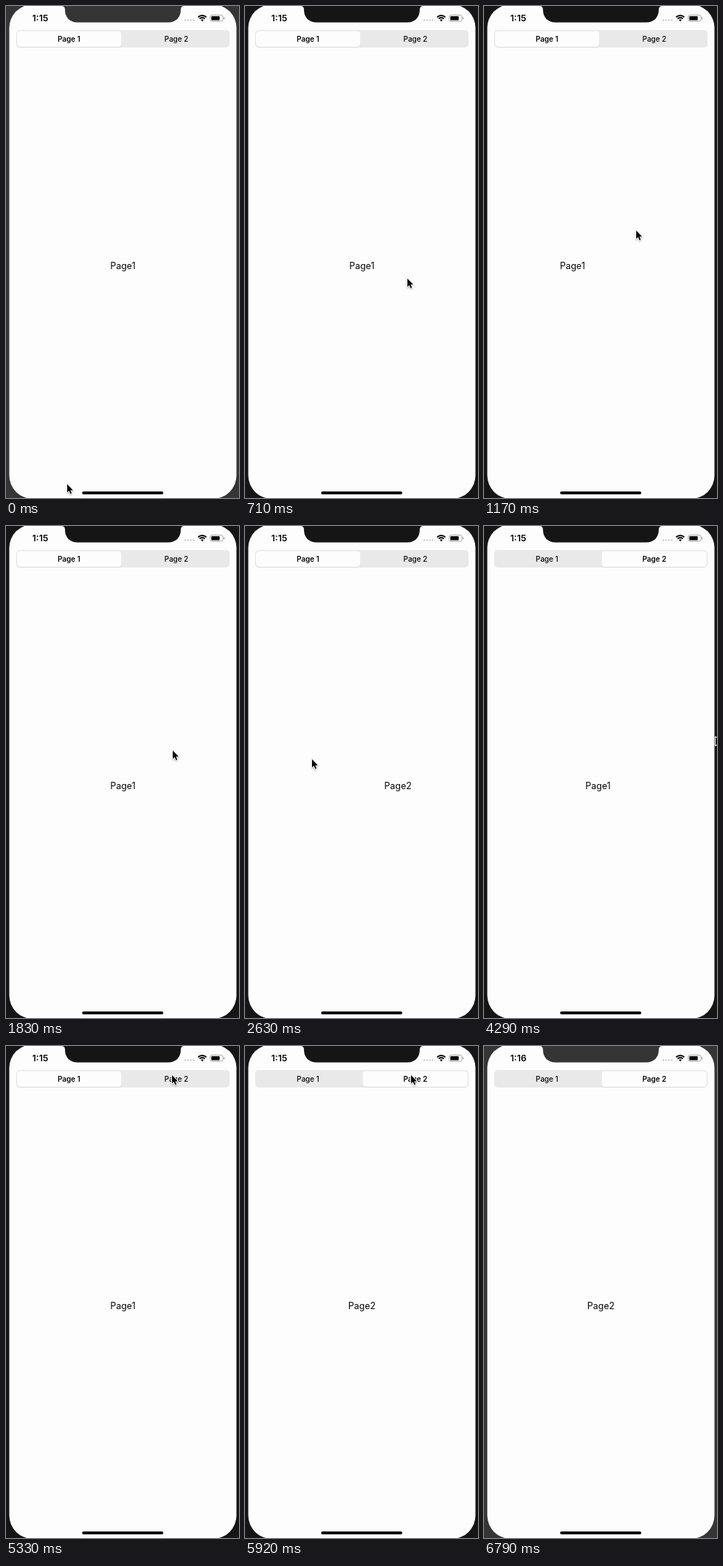
Recreate the animation shown at these times as an HTML page with a canvas. Size 320 by 675 pixels, loop 6830 ms.

```html
<!DOCTYPE html>
<html lang="en">
<head>
<meta charset="utf-8">
<title>Paged segments</title>
<style>
html, body { margin: 0; width: 100%; height: 100%; overflow: hidden; background: #151515; }
canvas { display: block; width: 320px; height: 675px; }
</style>
</head>
<body>
<canvas id="stage"></canvas>
<script>
const LOOP = 6830, PAGE_W = 312;
const INK = '#060606', PAPER = '#fdfdfd', TRACK = '#e9e9e9', EDGE = '#d8d8da';
const FONT = 'Inter, Roboto, sans-serif';
const canvas = document.getElementById('stage');
const ctx = canvas.getContext('2d');
const dpr = window.devicePixelRatio || 1;
canvas.width = 320 * dpr;
canvas.height = 675 * dpr;

const clamp = v => Math.max(0, Math.min(1, v));
const smooth = p => p * p * (3 - 2 * p);
const easeOut = p => 1 - (1 - p) ** 3;
const mix = (a, b, p) => a + (b - a) * p;
const span = (t, a, b) => clamp((t - a) / (b - a));

// Eased cursor path: [time, x, y]
const path = [
  [0, 84, 656], [420, 84, 656], [820, 254, 311], [1080, 209, 308],
  [1290, 209, 308], [1600, 229, 308], [1920, 229, 308], [2080, 232, 308],
  [2330, 232, 308], [2530, 92, 320], [3580, 92, 320], [3830, 152, 321],
  [4000, 152, 321], [4200, 318, 289.5], [4330, 318, 289.5], [4480, 334, 286],
  [4780, 334, 286], [5260, 228, 40], [6130, 228, 40], [6400, 262, -20], [LOOP, 262, -20]
];

function cursorAt(t) {
  let i = 0;
  while (i < path.length - 2 && t >= path[i + 1][0]) i++;
  const a = path[i], b = path[i + 1];
  const p = smooth(span(t, a[0], b[0]));
  return [mix(a[1], b[1], p), mix(a[2], b[2], p)];
}

// Scroll position: 0 is the first page, PAGE_W the second
function scrollAt(t) {
  if (t < 1290) return 39 * smooth(span(t, 840, 1080));
  if (t < 1600) return mix(39, 20, smooth(span(t, 1290, 1600)));
  if (t < 2330) return 20 * (1 - easeOut(span(t, 1600, 1830)));
  if (t < 2530) return 128 * smooth(span(t, 2330, 2530));
  if (t < 3000) return PAGE_W - 184 * Math.exp((2530 - t) / 77);
  if (t < 4000) return PAGE_W - 50 * smooth(span(t, 3580, 3830));
  if (t < 4120) return mix(262, 82, span(t, 4000, 4120) ** 1.4);
  if (t < 4560) return 82 * Math.exp((4120 - t) / 56);
  return PAGE_W * smooth(span(t, 5440, 5880));
}

// Selected segment, 0 to 1
function knobAt(t) {
  if (t < 4000) return smooth(span(t, 2950, 3230));
  if (t < 5400) return 1 - smooth(span(t, 4560, 4840));
  return smooth(span(t, 5410, 5690));
}

function box(x, y, w, h, r, color) {
  ctx.fillStyle = color;
  ctx.beginPath();
  ctx.roundRect(x, y, w, h, r);
  ctx.fill();
}

function text(str, x, y, size, weight, align = 'center') {
  ctx.font = `${weight} ${size}px ${FONT}`;
  ctx.textAlign = align;
  ctx.fillStyle = INK;
  ctx.fillText(str, x, y);
}

function drawNotch(color) {
  ctx.fillStyle = color;
  ctx.beginPath();
  ctx.moveTo(76, 0);
  ctx.quadraticCurveTo(81, 0, 81, 5);
  ctx.bezierCurveTo(81, 16, 88, 22.5, 98, 22.5);
  ctx.lineTo(223, 22.5);
  ctx.bezierCurveTo(233, 22.5, 240, 16, 240, 5);
  ctx.quadraticCurveTo(240, 0, 245, 0);
  ctx.fill();
}

function drawStatus(t) {
  text(t < 6300 ? '1:15' : '1:16', 36, 21, 12.4, 600, 'left');
  for (let i = 0; i < 4; i++) box(245 + i * 3.8, 18.2, 2.4, 2.4, 1.2, '#c9c9c9');

  ctx.strokeStyle = INK;
  ctx.lineWidth = 1.9;
  for (const r of [8, 5]) {
    ctx.beginPath();
    ctx.arc(269.5, 21, r, -Math.PI * 0.75, -Math.PI * 0.25);
    ctx.stroke();
  }
  ctx.fillStyle = INK;
  ctx.beginPath();
  ctx.moveTo(269.5, 21.3);
  ctx.arc(269.5, 21, 2.7, -Math.PI * 0.75, -Math.PI * 0.25);
  ctx.fill();

  ctx.strokeStyle = '#a4a4a4';
  ctx.lineWidth = 1;
  ctx.beginPath();
  ctx.roundRect(280.5, 12.5, 17.5, 8.5, 2.5);
  ctx.stroke();
  box(282, 14, 11.5, 5.6, 1.2, INK);
  box(299, 15.2, 1.2, 3.2, 0.6, '#a4a4a4');
}

function drawSegments(k) {
  box(14, 33, 293, 24, 5, TRACK);
  const x = mix(15, 161.5, k), w = mix(143.5, 144.5, k);
  box(x - 0.5, 35, w + 1, 22, 5, EDGE);
  box(x, 34.5, w, 21.5, 4.5, PAPER);
  text('Page 1', 86.5, 48.8, 10, k < 0.5 ? 600 : 500);
  text('Page 2', 234, 48.8, 10, k < 0.5 ? 500 : 600);
}

function drawCursor(x, y) {
  ctx.save();
  ctx.translate(x, y);
  ctx.beginPath();
  ctx.moveTo(0, 0);
  ctx.lineTo(0, 11.5);
  ctx.lineTo(2.6, 9.1);
  ctx.lineTo(4.5, 13.3);
  ctx.lineTo(6.3, 12.4);
  ctx.lineTo(4.5, 8.4);
  ctx.lineTo(8, 8.2);
  ctx.closePath();
  ctx.lineJoin = 'round';
  ctx.lineWidth = 2;
  ctx.strokeStyle = PAPER;
  ctx.shadowColor = 'rgba(0,0,0,0.3)';
  ctx.shadowBlur = 2 * dpr;
  ctx.shadowOffsetY = dpr;
  ctx.stroke();
  ctx.shadowColor = 'transparent';
  ctx.fillStyle = INK;
  ctx.fill();
  ctx.restore();
}

function draw(t) {
  const bezel = t < 420 || t >= 6750 ? '#353535' : '#151515';
  ctx.setTransform(dpr, 0, 0, dpr, 0, 0);
  ctx.fillStyle = bezel;
  ctx.fillRect(0, 0, 320, 675);

  ctx.save();
  ctx.beginPath();
  ctx.roundRect(4.5, -2, 312, 678, 32);
  ctx.clip();
  ctx.fillStyle = PAPER;
  ctx.fillRect(0, 0, 320, 675);
  const s = scrollAt(t);
  text('Page1', 160.5 - s, 361, 12.5, 400);
  text('Page2', 160.5 - s + PAGE_W, 361, 12.5, 400);
  drawStatus(t);
  drawSegments(knobAt(t));
  box(104.5, 666, 111.5, 4, 2, INK);
  ctx.restore();

  drawNotch(bezel);
  drawCursor(...cursorAt(t));
}

const start = performance.now();
function tick() {
  draw((performance.now() - start) % LOOP);
  requestAnimationFrame(tick);
}
tick();
</script>
</body>
</html>
```
